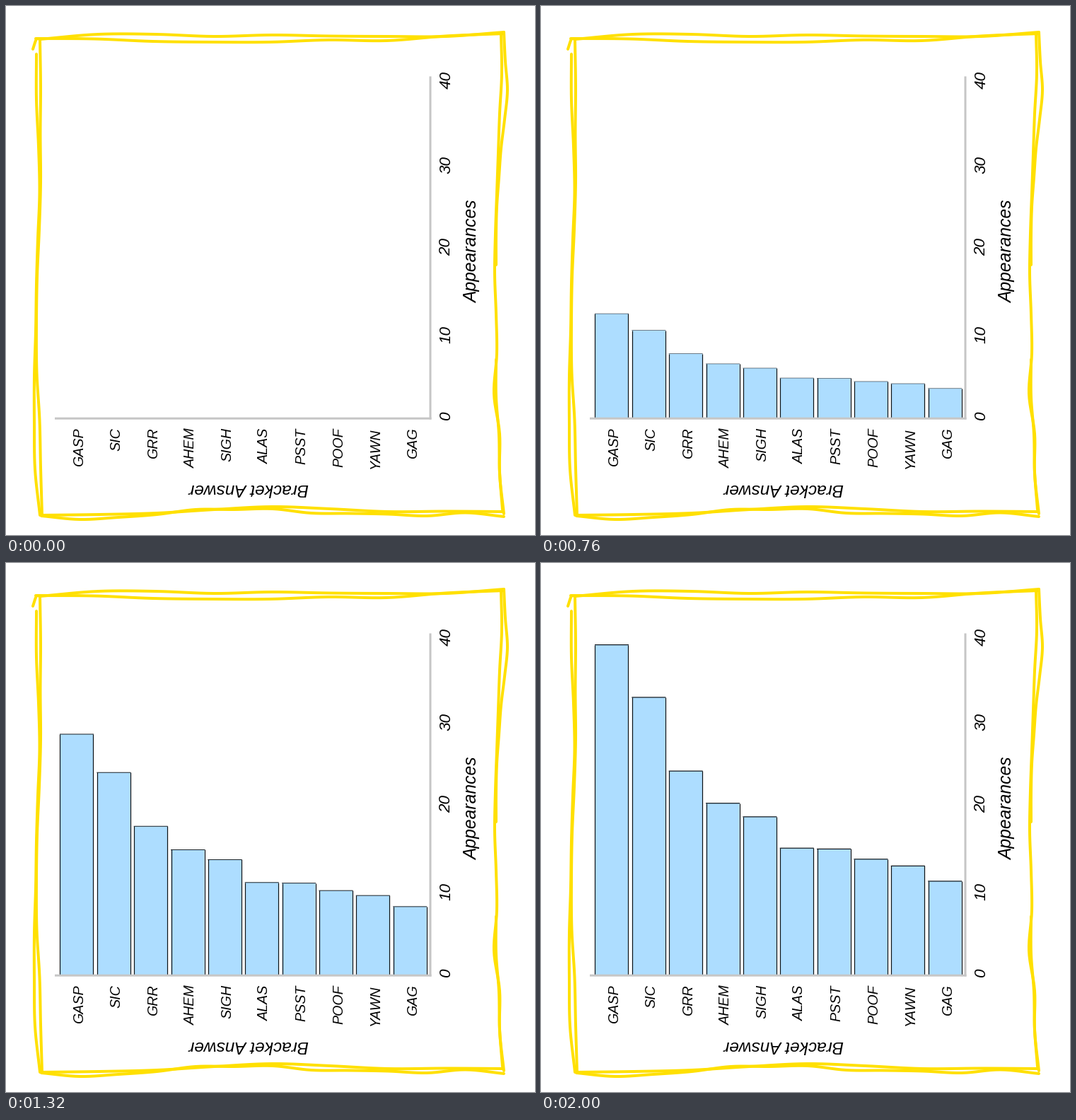
A matplotlib script for the animation above (4.96 s loop, 748 by 748 pixels).

```python
import math
import numpy as np
import matplotlib.pyplot as plt
from matplotlib.animation import FuncAnimation
from matplotlib.patches import Rectangle

SIZE, DPI = 748, 100
STEP_MS, LOOP_MS, GROW_MS = 40, 4960, 2000
YELLOW, BLUE, GREY, INK = "#ffe000", "#adddff", "#c6c6c6", "#0c1216"
BASE, UNIT = 582.9, 11.98          # chart zero line, pixels per appearance
LEFT, PITCH, BAR_W = 76.5, 52.35, 47

WORDS = {"GASP": 39, "SIC": 32.8, "GRR": 24.1, "AHEM": 20.3, "SIGH": 18.7,
         "ALAS": 15, "PSST": 14.9, "POOF": 13.7, "YAWN": 12.9, "GAG": 11.1}

fig = plt.figure(figsize=(SIZE / DPI, SIZE / DPI), dpi=DPI, facecolor="white")
ax = fig.add_axes([0, 0, 1, 1])
ax.set_xlim(0, SIZE)
ax.set_ylim(SIZE, 0)
ax.axis("off")


def pt(px):
    return px * 72 / DPI


def line(xs, ys, color, width, z, cap="butt", snap=False):
    return ax.plot(xs, ys, color=color, lw=pt(width), zorder=z, snap=snap,
                   solid_capstyle=cap, solid_joinstyle="round")[0]


def smooth(values, steps=8):
    """Cubic curve through evenly spaced values."""
    v = np.array(values, float)
    slope = np.gradient(v)
    u = np.linspace(0, len(v) - 1, steps * (len(v) - 1) + 1)
    i = np.minimum(u.astype(int), len(v) - 2)
    t = u - i
    ease = t * t * (3 - 2 * t)
    return (v[i] * (1 - ease) + v[i + 1] * ease
            + slope[i] * t * (1 - t) ** 2 - slope[i + 1] * t * t * (1 - t))


def pen(start, end, *offsets, upright=False):
    """Freehand line along one side, wandering through the offsets."""
    across = smooth(offsets)
    along = np.linspace(start, end, len(across))
    xs, ys = (across, along) if upright else (along, across)
    line(xs, ys, YELLOW, 4, 1, "round")


def label(x, y, text, size, angle=90, ha="center"):
    ax.text(x, y, text, fontsize=pt(size), rotation=angle, ha=ha,
            va="baseline", rotation_mode="anchor", color="black",
            family="Liberation Sans", style="italic", zorder=5)


def draw_border():
    pen(38, 48, 61, 47, 47)
    pen(48, 704, 47, 40, 40, 43, 41, 42.5, 43, 43, 37)
    pen(42, 704, 46, 46.5, 50, 51, 51, 48, 49, 42.5, 39)
    pen(50, 703, 720, 719, 717, 712, 708, 711, 715, 714.5, 715)
    pen(50, 704, 721, 726, 723, 719, 712, 712, 711, 717, 717.5, 718.5, 721,
        716.5, 722)
    pen(37, 366, 704, 706, 709, 705, 700, 697, 694, 693, 693, upright=True)
    pen(39, 718, 700, 701, 698, 696, 694, 692, 691, 693, 694, 690, 698, 698,
        704, upright=True)
    pen(500, 712, 693, 693, 697, 698, 702, upright=True)
    pen(68, 720, 43, 43, 46, 47.5, 45, 43, 42, 40, 40, 41, 48, upright=True)
    pen(47, 720, 48, 49, 48.5, 49, 47, 44, 43, 43.5, 47.5, 49, 51,
        upright=True)


def draw_axes():
    line([69, 601.5], [583.2, 583.2], GREY, 3, 4)
    line([600, 600], [99.5, 584.5], GREY, 3, 4)
    for i, y in enumerate([579.5, 464.5, 340.5, 224, 104]):
        label(628.5, y, str(10 * i), 22.5)
    label(666, 347, "Appearances", 24.6)
    label(343.5, 675.5, "Bracket Answer", 24.4, 180)


class Bar:
    def __init__(self, i, word, value):
        x = LEFT + PITCH * i
        self.height = value * UNIT
        self.fill = ax.add_patch(Rectangle((x, BASE), BAR_W, 0, lw=0,
                                           color=BLUE, zorder=2, snap=False))
        self.sides = [line([e, e], [BASE, BASE], INK, 1.2, 3, snap=True)
                      for e in (x, x + BAR_W)]
        self.cap = line([x - 0.5, x + BAR_W + 0.5], [BASE, BASE], INK, 1, 3)
        label(x + 33, 596.5, word, 19.6, ha="right")

    def grow(self, k):
        top = BASE - self.height * k
        self.fill.set_height(top - BASE)
        for side in self.sides:
            side.set_ydata([BASE, top])
        # the outline is stretched together with the bar
        self.cap.set_ydata([top, top])
        self.cap.set_linewidth(pt(0.2 + k))
        for part in (self.fill, self.cap, *self.sides):
            part.set_visible(k > 0)


def progress(frame):
    if frame < 2:
        return 0.0
    tick = math.floor(frame * STEP_MS * 60 / 1000)   # motion runs at 60 Hz
    p = min(tick * 1000 / 60 / GROW_MS, 1)
    return p * p * (3 - 2 * p)


def update(frame):
    for bar in bars:
        bar.grow(progress(frame))
    return []


draw_border()
draw_axes()
bars = [Bar(i, word, value) for i, (word, value) in enumerate(WORDS.items())]

anim = FuncAnimation(fig, update, frames=LOOP_MS // STEP_MS,
                     init_func=lambda: update(0), interval=STEP_MS,
                     repeat=True, repeat_delay=0, blit=False)
plt.show()
```
